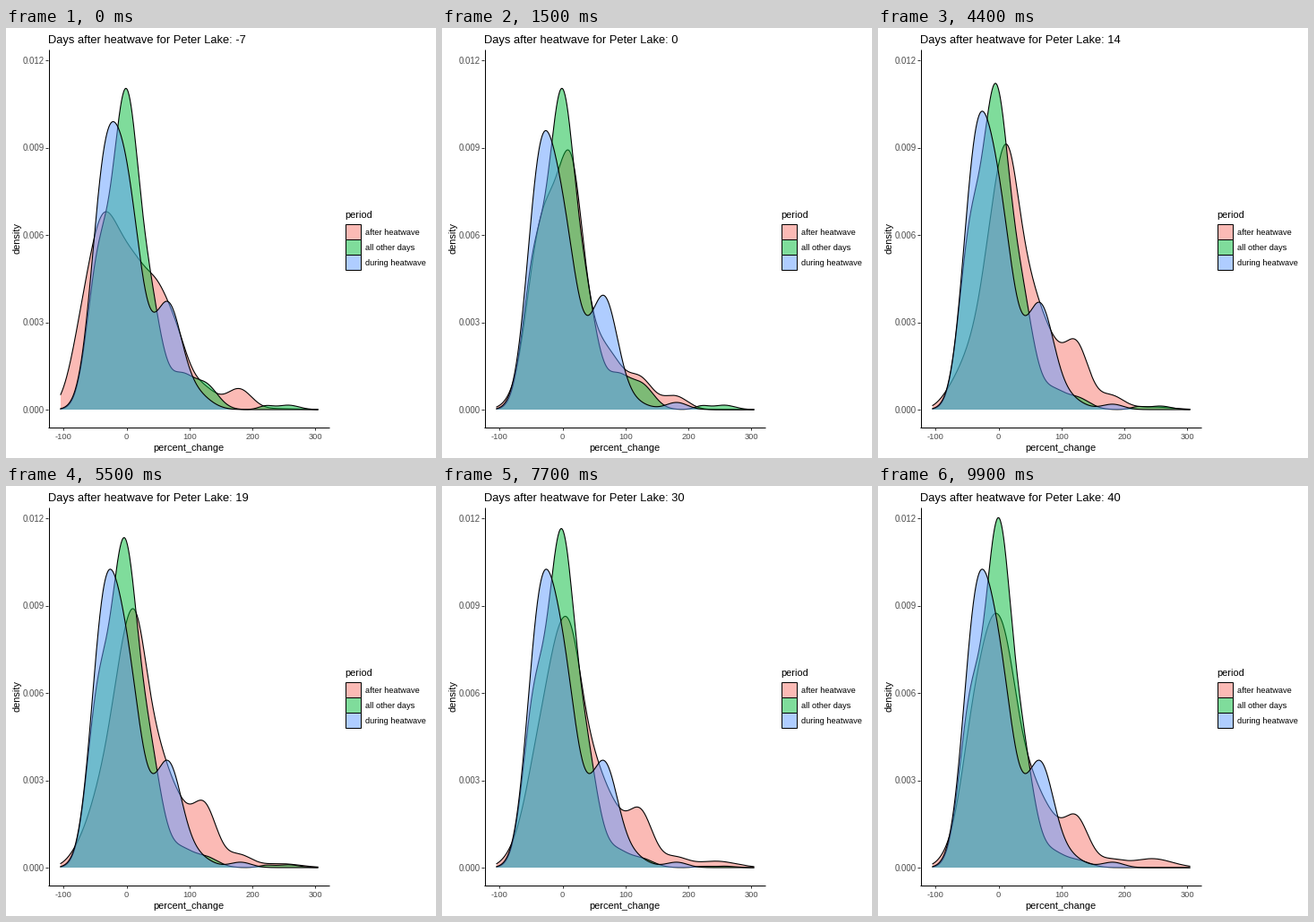
Write a matplotlib script that moves like this. It is 480x480 px and loops after 10000 ms.

```python
import numpy as np
import matplotlib.pyplot as plt
from matplotlib.animation import FuncAnimation
from matplotlib.patches import Polygon, Rectangle

SIZE, DPI = 480, 72
FRAMES, INTERVAL = 100, 100
FIRST_DAY, LAST_DAY = -7, 40
BASE = 426            # stage y of zero density
XS = np.linspace(61, 348, 512)

plt.rcParams["font.family"] = "Liberation Sans"

fig = plt.figure(figsize=(SIZE / DPI, SIZE / DPI), dpi=DPI, facecolor="white")
ax = fig.add_axes([0, 0, 1, 1])
ax.set(xlim=(0, SIZE), ylim=(SIZE, 0))
ax.axis("off")


def label(x, y, s, size, color="black", **kw):
    return ax.text(x, y, s, fontsize=size, color=color, **kw)


def rule(xs, ys, color="black"):
    ax.plot(xs, ys, color=color, lw=1, solid_capstyle="butt", snap=True, zorder=20)


class Density:
    """Sum of Gaussian bumps (centre, spread, *height on each key day)."""

    def __init__(self, name, color, row, days, *bumps):
        self.days = days
        self.bumps = [(np.exp(-((XS - c) / s) ** 2 / 2), heights)
                      for c, s, *heights in bumps]
        self.area = Polygon([[0, 0]] * 3, fc=color, alpha=0.5, lw=0, zorder=row)
        ax.add_patch(self.area)
        self.line, = ax.plot([], [], color="black", lw=1.1, zorder=row + 0.5)
        top = 218.5 + 17 * row
        box = (378.5, top), 17, 17
        ax.add_patch(Rectangle(*box, fc=color, alpha=0.5, lw=0))
        ax.add_patch(Rectangle(*box, fill=False, ec="black", lw=1, snap=True))
        label(401, top + 12.4, name, 9.3)

    def show(self, day):
        ys = BASE - sum(np.interp(day, self.days, h) * bell for bell, h in self.bumps)
        self.line.set_data(XS, ys)
        self.area.set_xy([*zip(XS, ys), (XS[-1], BASE), (XS[0], BASE)])


groups = [
    Density("after heatwave", "#F8766D", 0, [-7, 0, 8, 14, 40],
            (86, 14, 80, 12, 10, 22, 18),
            (108, 14, 165, 165, 75, 55, 145),
            (129, 13, 110, 140, 140, 150, 185),
            (146, 12, 80, 190, 240, 185, 130),
            (166, 14, 110, 65, 65, 115, 85),
            (190, 14, 70, 45, 65, 62, 45),
            (221, 14, 22, 33, 78, 72, 55),
            (260, 14, 23, 15, 20, 15, 8),
            (306, 22, 1, 0, 0, 3, 10)),
    Density("all other days", "#00BA38", 1, [0, 14, 40],
            (104, 13, 165, 195, 180),
            (126, 11, 165, 200, 170),
            (138, 11, 190, 160, 215),
            (157, 15, 138, 138, 150),
            (196, 12, 32, 18, 14),
            (222, 14, 28, 13, 8),
            (290, 8, 4, 3, 0),
            (315, 12, 5, 4, 0)),
    Density("during heatwave", "#619CFF", 2, [-7, 0, 8],
            (108.5, 14.6, 210, 228, 240),
            (134, 17, 235, 195, 215),
            (181, 15, 113, 122, 113),
            (212, 16, 16, 8, 12),
            (262, 12, 0, 8, 6)),
]

rule([47.5, 47.5], [24, 446])
rule([47, 361], [445.5, 445.5])
for i in range(5):
    x, y = 64.3 + 70.25 * i, BASE + 0.4 - 97.5 * i
    rule([x, x], [446, 449], "#333333")
    label(x, 459.3, str(100 * (i - 1)), 9.4, "#4D4D4D", ha="center")
    rule([44, 47], [y, y], "#333333")
    label(42.5, y + 3.4, f"{0.003 * i:.3f}", 9.6, "#4D4D4D", ha="right")

label(204.3, 472.5, "percent_change", 11, ha="center")
label(12, 235, "density", 11, ha="center", va="center", rotation=90)
label(378, 212, "period", 11)
title = label(47, 17, "", 12.9)


def update(i):
    day = FIRST_DAY + (LAST_DAY - FIRST_DAY) * i / (FRAMES - 1)
    title.set_text(f"Days after heatwave for Peter Lake: {round(day)}")
    for g in groups:
        g.show(day)
    return [title]


anim = FuncAnimation(fig, update, frames=FRAMES, interval=INTERVAL,
                     repeat=True, repeat_delay=0)
plt.show()
```
